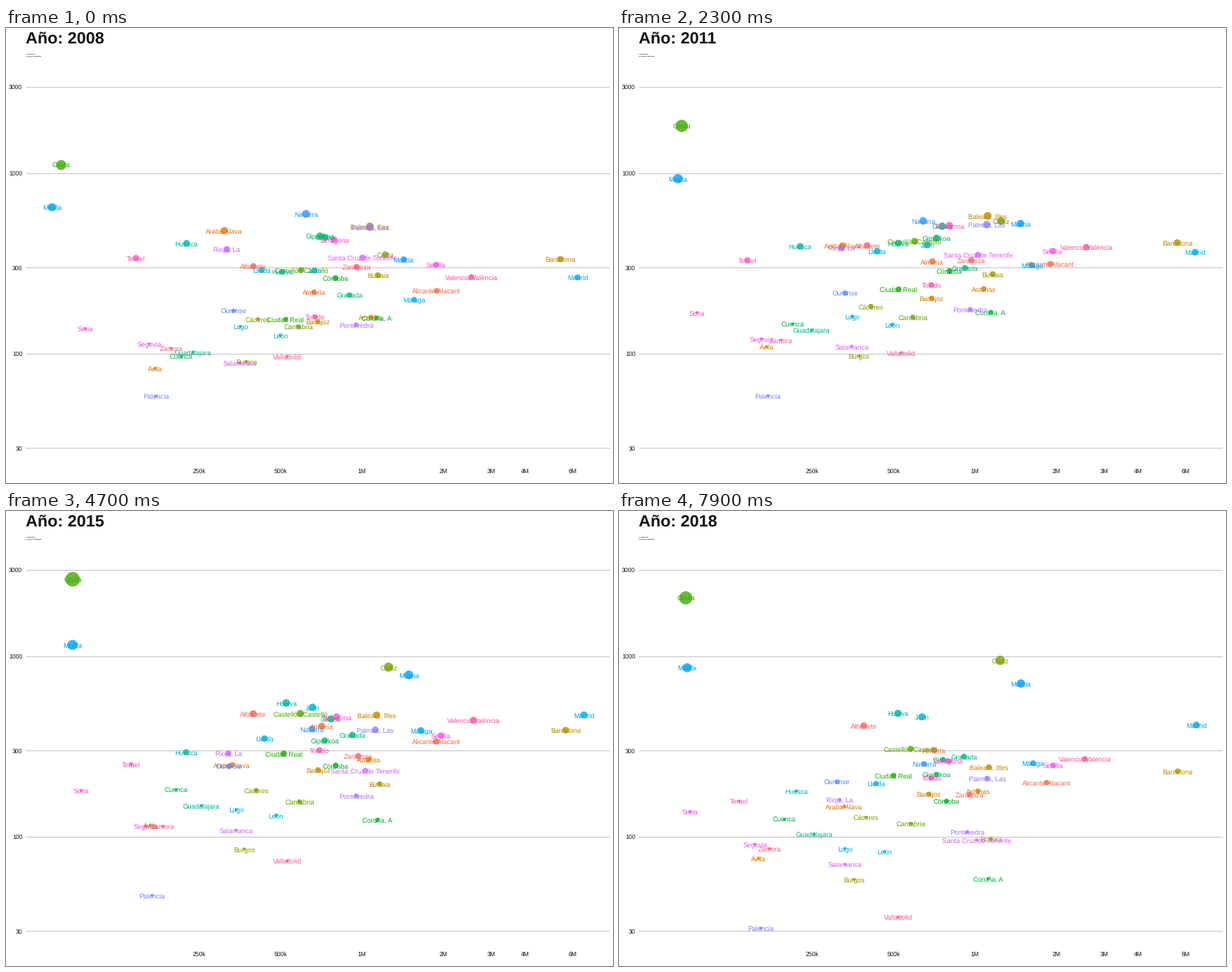
Write a matplotlib script that moves like this. It is 864 by 648 pixels and loops after 8 s.

```python
import math

import matplotlib.pyplot as plt
import numpy as np
from matplotlib.animation import FuncAnimation

W, H, DPI = 864, 648, 72
FRAMES, INTERVAL = 80, 100
PEAK, LAST_MOVE = 32, 69            # steps of the crisis peak and of the final rest
FIRST_YEAR, YEARS = 2008, 10
Y_1000, DECADE = 206.5, 257.4       # vertical log scale
X_MILLION, OCTAVE = 506.5, 115.9    # horizontal log scale
INK = "#111214"

plt.rcParams["font.family"] = "Liberation Sans"
plt.rcParams["text.hinting"] = "none"

names, paths = [], []


def province(name, x_first, x_last, y_first, y_peak, y_last):
    names.append(name)
    paths.append((x_first, x_last, y_first, y_peak, y_last))


province("Albacete", 352, 348.5, 340, 281, 306.5)
province("Alicante/Alacant", 613, 608.5, 375, 299, 387.5)
province("Almería", 438.5, 448.5, 377, 289.5, 341.5)
province("Araba/Álava", 310.5, 320.5, 289.5, 332.5, 421.5)
province("Asturias", 519.5, 511, 412.5, 332, 399.5)
province("Ávila", 212, 198.5, 485.5, 424, 495.5)
province("Badajoz", 443.5, 441, 419, 352, 404)
province("Balears, Illes", 518, 526.5, 283, 253.5, 365.5)
province("Barcelona", 789, 795, 330, 283, 371.5)
province("Bizkaia", 529.5, 529.5, 353, 349.5, 467.5)
province("Burgos", 342, 334.5, 476, 460, 525.5)
province("Cáceres", 358.5, 351.5, 415.5, 379, 437)
province("Cádiz", 540, 542.5, 323.5, 228, 213.5)
province("Cantabria", 416, 415.5, 426, 399, 446)
province("Castellón/Castelló", 420, 415, 345.5, 263.5, 339.5)
province("Ceuta", 78.5, 95, 196, 84.5, 124.5)
province("Ciudad Real", 398, 390.5, 415.5, 330, 377.5)
province("Córdoba", 469, 466, 357, 337, 414)
province("Coruña, A", 527, 525.5, 413.5, 398, 524.5)
province("Cuenca", 249.5, 235.5, 468.5, 376, 440)
province("Gipuzkoa", 447, 452, 297, 303, 376)
province("Girona", 454, 461, 299, 267, 355)
province("Granada", 489, 491, 381, 304, 350.5)
province("Guadalajara", 266, 277.5, 462.5, 399.5, 461)
province("Huelva", 393, 397, 348, 266.5, 289)
province("Huesca", 257, 252.5, 307.5, 316, 399.5)
province("Jaén", 439, 431.5, 346, 273.5, 294)
province("León", 390.5, 378, 438.5, 408, 486)
province("Lleida", 364, 366, 345.5, 292, 389)
province("Lugo", 333.5, 321.5, 426, 397.5, 481.5)
province("Madrid", 813.5, 821.5, 356, 284, 305.5)
province("Málaga", 581, 589.5, 387.5, 289.5, 360)
province("Melilla", 65.5, 97, 256, 175, 224)
province("Murcia", 566, 572, 330.5, 228, 246.5)
province("Navarra", 427, 434, 265.5, 285.5, 361)
province("Ourense", 324, 310.5, 403.5, 353, 386.5)
province("Palencia", 213.5, 202, 525, 524, 595)
province("Palmas, Las", 518, 524, 284.5, 277, 381.5)
province("Pontevedra", 498.5, 495.5, 423.5, 380, 458)
province("Rioja, La", 314.5, 314, 316, 312, 412)
province("Salamanca", 332.5, 322, 478, 430.5, 504)
province("Santa Cruz de Tenerife", 507.5, 509.5, 328, 320, 469.5)
province("Segovia", 204, 193.5, 450.5, 436.5, 475.5)
province("Sevilla", 612, 617.5, 338, 299, 363)
province("Soria", 112.5, 101, 429, 383.5, 429)
province("Tarragona", 467, 468.5, 302.5, 262, 357)
province("Teruel", 185, 171, 328.5, 334.5, 414)
province("Toledo", 440, 444.5, 412, 321.5, 381)
province("Valencia/València", 662.5, 663, 355.5, 270.5, 354)
province("Valladolid", 400, 397, 468.5, 458, 579)
province("Zamora", 235, 214.5, 457, 433.5, 481.5)
province("Zaragoza", 499, 499, 341, 321.5, 404.5)

x_first, x_last, y_first, y_peak, y_last = np.array(paths).T


def positions(step):
    # Populations drift steadily, with a bulge before the slowdown.
    u = step / LAST_MOVE
    drift = x_last - x_first
    x = x_first + drift * u + (2.8 + 0.2 * np.maximum(drift, 0)) * math.sin(math.pi * u)
    # Rates climb in two bursts to the peak, then ease away.
    if step <= PEAK:
        rise = np.interp(step, (0, 11, 23, PEAK), (0, 0.32, 0.5, 1))
        return x, y_first + (y_peak - y_first) * rise
    fall = ((step - PEAK) / (LAST_MOVE - PEAK)) ** 1.2
    return x, y_peak + (y_last - y_peak) * fall


def radii(x, y):
    """Dots grow with the rate; those low for their population stay tiny."""
    value = 1000 * 10 ** ((Y_1000 - y) / DECADE)
    full = 1.3 + 0.177 * np.sqrt(value)
    weight = np.clip((300 + 0.33 * x - y) / 40 + 0.5, 0, 1)
    return 2.3 + weight * (full - 2.3)


def hue_color(hue, chroma=100, light=65):
    """Polar LUV to RGB, slightly deepened."""
    un, vn = 0.1978398, 0.4683363
    a = math.radians(hue)
    u = chroma * math.cos(a) / (13 * light) + un
    v = chroma * math.sin(a) / (13 * light) + vn
    y = ((light + 16) / 116) ** 3
    x = 9 * y * u / (4 * v)
    z = 3 * y / v - x / 3 - 5 * y
    rgb = np.array([3.2406 * x - 1.5372 * y - 0.4986 * z,
                    -0.9689 * x + 1.8758 * y + 0.0415 * z,
                    0.0557 * x - 0.2040 * y + 1.0570 * z])
    rgb = np.clip(rgb, 0, 1)
    rgb = np.where(rgb <= 0.0031308, 12.92 * rgb, 1.055 * rgb ** (1 / 2.4) - 0.055)
    return np.clip(rgb, 0, 1) ** 1.2


fig = plt.figure(figsize=(W / DPI, H / DPI), dpi=DPI, facecolor="white")
ax = fig.add_axes((0, 0, 1, 1))
ax.set(xlim=(0, W), ylim=(H, 0))
ax.axis("off")


def write(x, y, text, size, **style):
    style = {"color": INK, "va": "baseline", **style}
    return ax.text(x, y, text, size=size, **style)


for value in (30, 100, 300, 1000, 3000):
    y = Y_1000 - DECADE * math.log10(value / 1000)
    ax.plot((28, 859), (y, y), color="#c8c8c8", lw=1.2, solid_capstyle="butt", zorder=1)
    write(23.3, y + 3.4, str(value), 8.6, ha="right")
for millions in (0.25, 0.5, 1, 2, 3, 4, 6):
    label = f"{millions}M" if millions >= 1 else f"{millions * 1000:.0f}k"
    write(X_MILLION + OCTAVE * math.log2(millions), 634, label, 8.6, ha="center")

title = write(27.7, 21.6, "", 23.4, weight="bold")
write(28, 37.7, "x: población", 2.2, weight="bold")
write(28, 40.2, "y: tasa por habitante", 2.2, weight="bold")

count = len(names)
colors = [hue_color(15 + 360 * i / count) for i in range(count)]
dots = ax.scatter(x_first, y_first, c=colors, alpha=0.78, linewidths=0, zorder=2)
labels = [write(0, 0, name, 9.6, color=color, ha="center", zorder=3)
          for name, color in zip(names, colors)]


def draw(frame):
    step = min(frame, LAST_MOVE)
    title.set_text(f"Año: {int(FIRST_YEAR + YEARS * step / LAST_MOVE + 0.5)}")
    x, y = positions(step)
    dots.set_offsets(np.column_stack((x, y - 0.8)))
    dots.set_sizes((2 * radii(x, y)) ** 2)
    for label, px, py in zip(labels, x, y):
        label.set_position((px, py + 3.4))
    return [title, dots, *labels]


anim = FuncAnimation(fig, draw, frames=FRAMES, interval=INTERVAL, repeat=True,
                     repeat_delay=0, init_func=lambda: draw(0))
plt.show()
```
